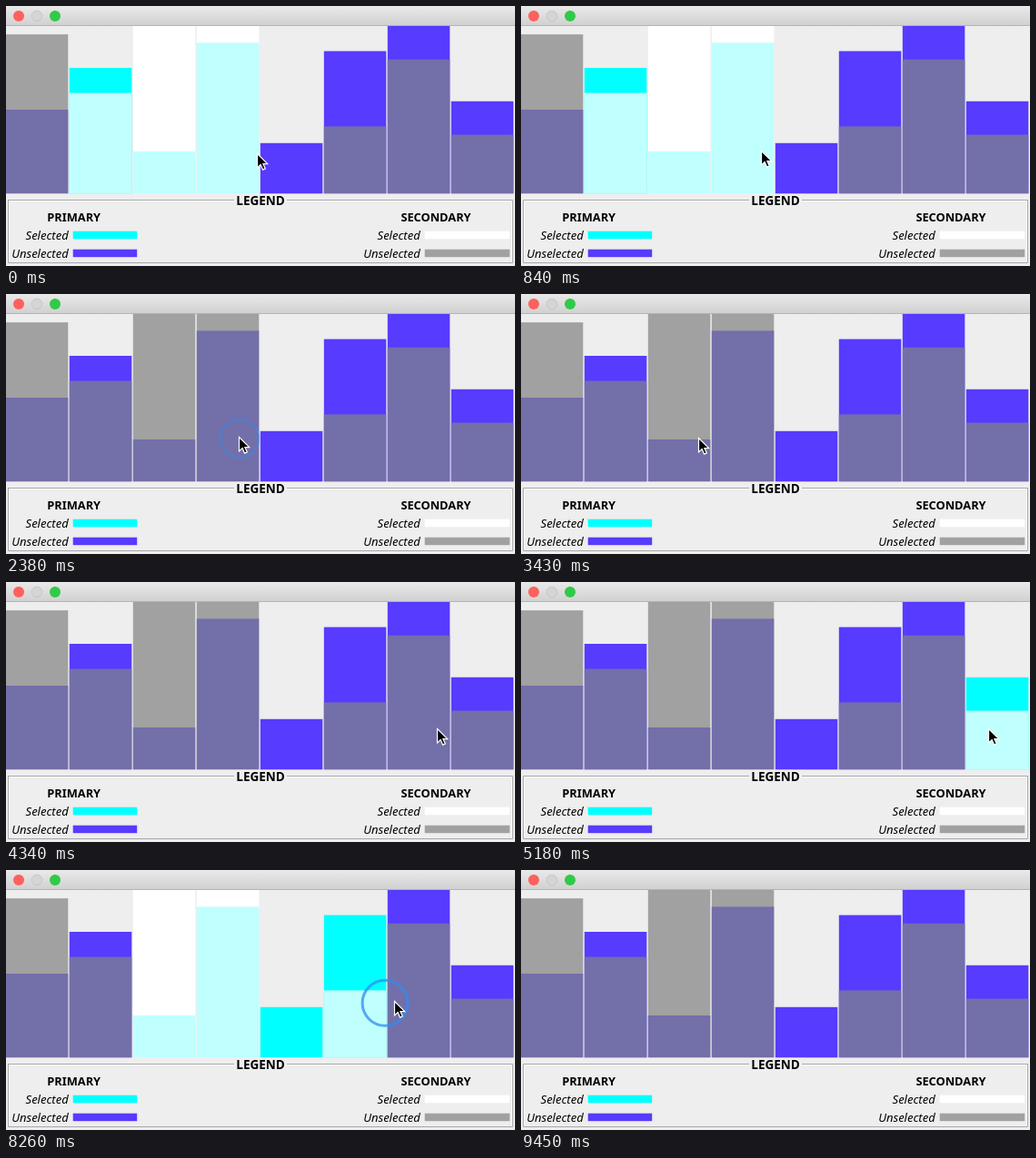
Write an HTML page that moves like this. It is 560 px wide and 286 px high and loops after 9870 ms.

```html
<!DOCTYPE html>
<html lang="en">
<head>
<meta charset="utf-8">
<title>Bar selection</title>
<style>
html, body { margin: 0; width: 100%; height: 100%; overflow: hidden; background: #eee; }
svg { display: block; width: 560px; height: 286px; }
text { font: 500 13px "Noto Sans", "Open Sans", sans-serif; fill: #000; }
.title { font-weight: 700; font-size: 13.5px; text-anchor: middle; }
.head { font-weight: 600; font-size: 12.8px; text-anchor: middle; }
.label { font-style: italic; text-anchor: end; }
</style>
</head>
<body>
<svg viewBox="0 0 560 286">
  <defs>
    <linearGradient id="chrome" x2="0" y2="1">
      <stop offset="0" stop-color="#e9e9e9"/>
      <stop offset="1" stop-color="#d1d1d1"/>
    </linearGradient>
  </defs>
  <rect width="560" height="286" fill="#eee"/>
  <rect width="560" height="21" fill="url(#chrome)"/>
  <rect y="21" width="560" height="1" fill="#b3b3b3"/>
  <circle cx="14" cy="11" r="6" fill="#fc615c"/>
  <circle cx="34" cy="11" r="5.7" fill="#d5d5d5" stroke="#bdbdbd" stroke-width=".7"/>
  <circle cx="54" cy="11" r="6" fill="#32c948"/>
  <g id="bars"></g>
  <g fill="none">
    <path d="M251 214.5H3.5V282.5H556.5V214.5H309" stroke="#fff"/>
    <path d="M251 213.5H2.5V282.5H557.5V213.5H309" stroke="#a6a6a6"/>
  </g>
  <text class="title" x="280" y="219">LEGEND</text>
  <g id="legend"></g>
  <circle id="ring" fill="none" stroke="#2f8cf0"/>
  <path id="cursor" d="M.5 1.5v15.4l3.6-3.3 2.4 5.5 2.8-1.2-2.4-5.3h4.8z"
        fill="#000" stroke="#fff" stroke-width="1.2"/>
</svg>
<script>
const LOOP = 9870, STEP = 70;
const FLOOR = 206, UNIT = 9.2, PITCH = 70;
const DRAG = 7420, DROP = 8890, CLEAR = 9380;
const CLICK = 140, FADE = 140, LAG = 35;

const $ = id => document.getElementById(id);

function set(node, attrs) {
  for (const key in attrs) node.setAttribute(key, attrs[key]);
}

function add(parent, tag, attrs, text = "") {
  const node = document.createElementNS("http://www.w3.org/2000/svg", tag);
  set(node, attrs);
  node.textContent = text;
  parent.append(node);
  return node;
}

// Values on a scale of 0 to 20
const primary = [10, 15, 5, 18, 6, 17, 20, 11];
const secondary = [19, 12, 20, 20, 0, 8, 16, 7];
const colors = {
  on: { primary: "#00ffff", secondary: "#ffffff", both: "#bffffd" },
  off: { primary: "#573bff", secondary: "#a1a1a1", both: "#736fa9" }
};

const bars = primary.map((a, i) => {
  const b = secondary[i];
  const block = value => add($("bars"), "rect", {
    x: i * PITCH - 0.2, y: FLOOR - value * UNIT, width: 68.5, height: value * UNIT + 0.2
  });
  return {
    kind: a > b ? "primary" : "secondary",
    tall: block(Math.max(a, b)),
    shared: block(Math.min(a, b))
  };
});

function legend(name, mid, x, width, kind) {
  const group = $("legend");
  add(group, "text", { class: "head", x: mid, y: 237 }, name);
  ["Selected", "Unselected"].forEach((label, row) => {
    const y = 247.7 + row * 20;
    add(group, "text", { class: "label", x: x - 5, y: y + 9.3 }, label);
    add(group, "rect", { x, y, width, height: 8.5, fill: colors[row ? "off" : "on"][kind] });
  });
}
legend("PRIMARY", 74.7, 73.7, 70.5, "primary");
legend("SECONDARY", 473, 460.7, 93.5, "secondary");

// Pointer stops: time, x, y
const stops = [
  [0, 276, 161], [1500, 256, 156], [2800, 256, 156], [3430, 195, 157],
  [4620, 520, 161], [5180, 514, 160], [6510, 479, 168], [6930, 479, 168],
  [DRAG, 165, 150], [8260, 427, 143], [9030, 575, 148], [LOOP, 575, 148]
];
const clicks = [1680, 2170, 4690, 6790];
const presses = [...clicks.map(t => [t, t + CLICK]), [DRAG, DROP]];

// Free moves ease in and out; the drag is steady
function pointer(t) {
  const next = Math.max(1, stops.findIndex(s => s[0] > t));
  const [t0, x0, y0] = stops[next - 1], [t1, x1, y1] = stops[next];
  let k = Math.max(0, (t - t0) / (t1 - t0));
  if (t < DRAG) k = k * k * (3 - 2 * k);
  return [x0 + (x1 - x0) * k, y0 + (y1 - y0) * k];
}

const barAt = t => Math.min(bars.length - 1, Math.floor(pointer(t)[0] / PITCH));

// Inclusive range of selected bars, or null
function selection(t) {
  if (t >= CLEAR) return null;
  if (t >= DRAG) return [2, Math.max(2, barAt(t - LAG))];
  let range = [1, 3];
  for (const time of clicks.filter(c => c <= t)) {
    const i = barAt(time);
    const alone = range && range[0] === i && range[1] === i;
    range = alone ? null : [i, i];
  }
  return range;
}

function drawRing(t) {
  const press = presses.find(([down, up]) => t >= down && t < up + FADE);
  if (!press) return set($("ring"), { opacity: 0 });
  const grow = Math.min(1, (t - press[0]) / CLICK);
  const fade = Math.max(0, (t - press[1]) / FADE);
  const size = grow * (1 - fade);
  const [x, y] = pointer(t - LAG);
  set($("ring"), {
    cx: x + 1, cy: y + 3, r: 17 + 8 * size,
    "stroke-width": 2 + size, opacity: 0.18 + 0.57 * size
  });
}

function draw(t) {
  const range = selection(t);
  bars.forEach((bar, i) => {
    const on = range && i >= range[0] && i <= range[1];
    const palette = colors[on ? "on" : "off"];
    set(bar.tall, { fill: palette[bar.kind] });
    set(bar.shared, { fill: palette.both });
  });
  drawRing(t);
  set($("cursor"), { transform: `translate(${pointer(t).map(Math.round)})` });
}

const start = performance.now();
function tick() {
  const t = (performance.now() - start) % LOOP;
  draw(Math.floor(t / STEP) * STEP);
  requestAnimationFrame(tick);
}
tick();
</script>
</body>
</html>
```
